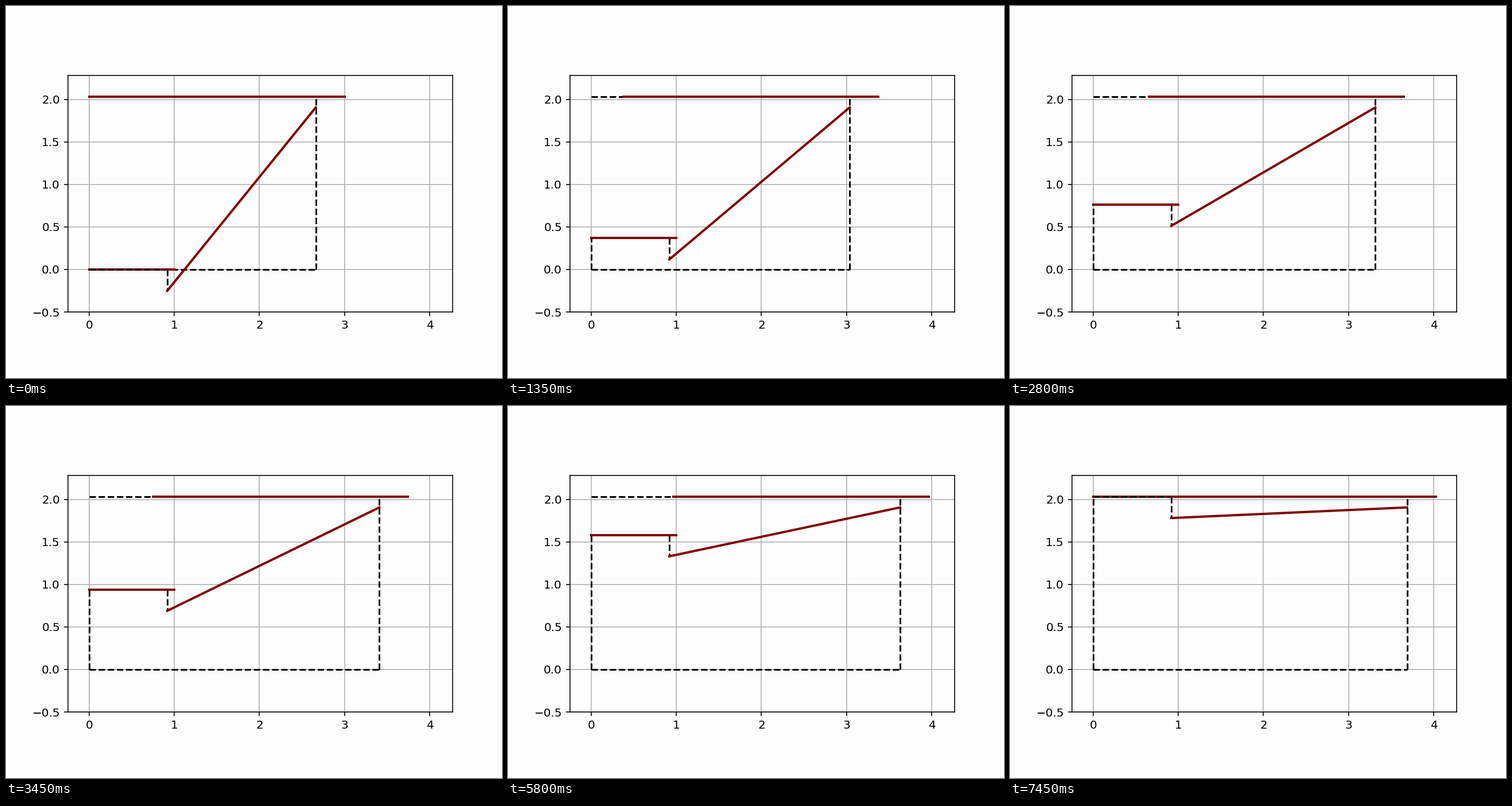
These frames come from a looping animation (864 by 648 pixels, 7.5 s). A matplotlib script:

```python
import numpy as np
import matplotlib.pyplot as plt
from matplotlib.animation import FuncAnimation

FRAMES = 150
TOP = 2.03          # height of the upper slider
PIN = 0.917         # x of the lower joint
DROP, GAP = 0.25, 0.125
ROD = 2.773
REACH = TOP - GAP   # height of the upper joint
PAPER = "#fdfdfd"

fig, ax = plt.subplots(figsize=(6, 4.5), dpi=144, facecolor=PAPER)
ax.set_facecolor(PAPER)
ax.set_aspect("equal")
ax.set_xlim(-0.25, 4.268)
ax.set_ylim(-0.5, TOP + 0.248)
ax.set_xticks(range(5))
ax.set_yticks(np.arange(-0.5, 2.1, 0.5))
ax.grid(True)


def bar():
    return ax.plot([], [], color="maroon", lw=2)[0]


def dash():
    return ax.plot([], [], "k--", lw=1.5)[0]


# Created in stacking order
arm = bar()
rise, base, post, hook, trail = [dash() for _ in range(5)]
tip, rod, slider = [bar() for _ in range(3)]
parts = [arm, rise, base, post, hook, trail, tip, rod, slider]


def joint_x(h):
    return PIN + np.sqrt(ROD**2 - (REACH - h + DROP) ** 2)


START = joint_x(0)


def update(i):
    h = TOP * i / (FRAMES - 1)
    x = joint_x(h)
    shift = x - START
    arm.set_data([0, PIN], [h, h])
    tip.set_data([PIN, 1], [h, h])
    rise.set_data([0, 0], [0, h])
    base.set_data([0, x], [0, 0])
    post.set_data([x, x], [0, TOP])
    hook.set_data([PIN, PIN], [h, h - DROP])
    trail.set_data([0, shift], [TOP, TOP])
    rod.set_data([PIN, x], [h - DROP, REACH])
    slider.set_data([shift, shift + 3], [TOP, TOP])
    return parts


anim = FuncAnimation(fig, update, frames=FRAMES, interval=50,
                     repeat=True, repeat_delay=0)
plt.show()
```
